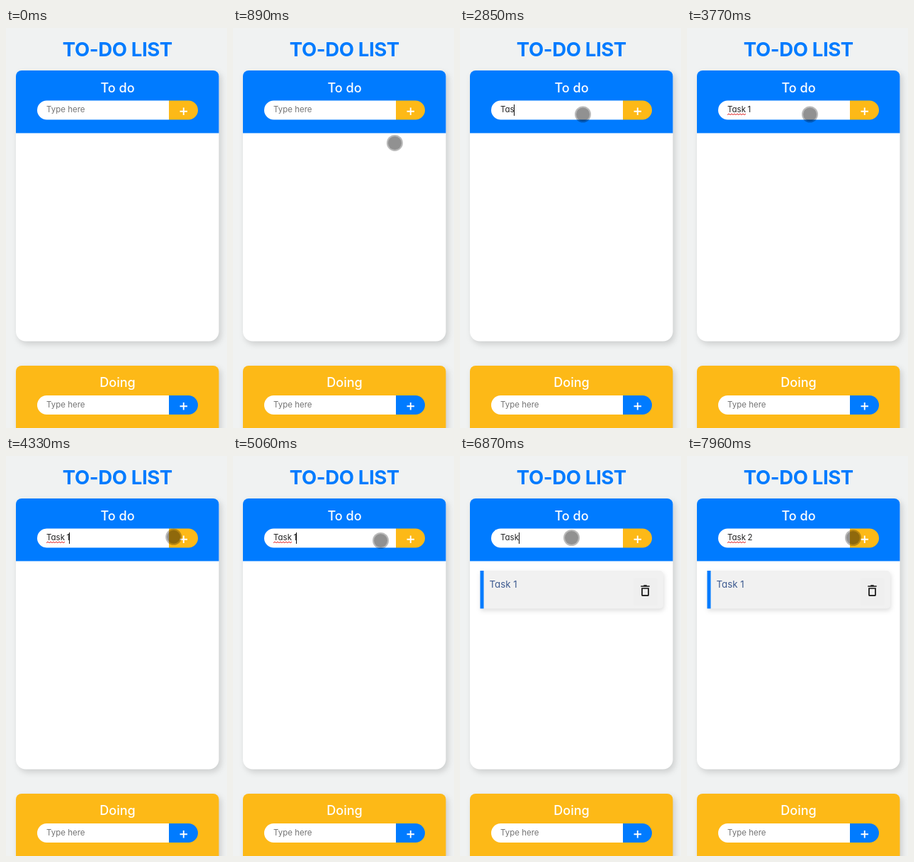
Animation of 312x565 px, one loop 8 s. Source, as an HTML page:

```html
<!DOCTYPE html>
<html lang="en">
<head>
<meta charset="utf-8">
<title>To-do list</title>
<style>
  html, body { margin: 0; width: 100%; height: 100%; overflow: hidden; background: #f0f2f2; }
  svg { display: block; width: 312px; height: 565px; }
  text { font-family: Inter, "Open Sans", sans-serif; font-feature-settings: "cv11"; }
  .title { font-size: 27.5px; font-weight: 700; fill: #007bff; text-anchor: middle; letter-spacing: -.35px; }
  .head { font-size: 18px; font-weight: 500; fill: #fff; text-anchor: middle; }
  .field { font-size: 11.5px; fill: #222; word-spacing: -.8px; }
  .hint { fill: #757575; word-spacing: 0; }
  .task { font-size: 13.3px; fill: #3d5a90; }
  .panel { filter: drop-shadow(3px 4px 4px rgba(0, 0, 0, .15)); }
  .card { filter: drop-shadow(1px 3px 3px rgba(0, 0, 0, .13)); }
</style>
</head>
<body>
<svg viewBox="0 0 312 565">
  <defs>
    <g id="bar">
      <path d="M57.5 0H230V27H57.5A13.5 13.5 0 0 1 57.5 0Z" fill="#fff"/>
      <path d="M230 0H257.5A13.5 13.5 0 0 1 257.5 27H230Z" fill="currentColor"/>
      <path d="M245.5 15.2H256M250.75 10V20.4" stroke="#fff" stroke-width="1.9"/>
    </g>
  </defs>
  <rect width="312" height="565" fill="#f0f2f2"/>
  <text class="title" x="157.3" y="40.3">TO-DO LIST</text>

  <path class="panel" d="M14 68a8 8 0 0 1 8-8H292.500a8 8 0 0 1 8 8V428.500a14 14 0 0 1-14 14H28a14 14 0 0 1-14-14Z" fill="#fff"/>
  <path d="M14 148.500V68a8 8 0 0 1 8-8H292.500a8 8 0 0 1 8 8V148.500Z" fill="#007bff"/>
  <text class="head" x="157.500" y="91">To do</text>
  <use href="#bar" y="102.500" color="#fdb917"/>

  <path class="panel" d="M14 570V485a8 8 0 0 1 8-8H292.500a8 8 0 0 1 8 8V570Z" fill="#fdb917"/>
  <text class="head" x="157.500" y="507.200">Doing</text>
  <use href="#bar" y="519" color="#007bff"/>
  <text class="field hint" x="57" y="536.300">Type here</text>

  <g id="card">
    <path class="card" d="M28.500 162H282a5 5 0 0 1 5 5V210.500a5 5 0 0 1-5 5H28.500Z" fill="#f1f1f1"/>
    <path d="M28.500 162H33.500V215.500H28.500Z" fill="#007bff"/>
    <rect x="244.500" y="172.500" width="34" height="39" rx="2" fill="#efefef"/>
    <text class="task" x="41.500" y="186">Task 1</text>
    <g fill="none" stroke="#111" stroke-width="1.700">
      <path d="M255.300 184H267.700M259.300 183H263.700"/>
      <path d="M257 187H266V196.200a1 1 0 0 1-1 1H258a1 1 0 0 1-1-1Z"/>
    </g>
  </g>

  <text id="entry" class="field" x="57" y="119.300"></text>
  <path id="wave" fill="none" stroke="#e02020" stroke-width="1"/>
  <path id="caret" d="M0 108V124" stroke="#111" stroke-width="1"/>
  <g id="pointer">
    <circle r="11.500" fill="#000" fill-opacity=".27"/>
    <circle r="9.500" fill="#000" fill-opacity=".22"/>
  </g>
</svg>
<script>
const LOOP = 8000;
const $ = id => document.getElementById(id);
const card = $('card'), entry = $('entry'), wave = $('wave'), caret = $('caret'), pointer = $('pointer');

// [time, text, caret x]
const typing = [
  [0, '', 58],
  [2460, 'T', 63.5], [2600, 'Ta', 70.5], [2780, 'Tas', 76.5], [2980, 'Task', 83.5],
  [3210, 'Task ', 86], [3310, 'Task 1', 89.5],
  [5400, '', 58],
  [6320, 'T', 63.5], [6480, 'Ta', 70.5], [6680, 'Tas', 76.5], [6870, 'Task', 83.5],
  [7010, 'Task ', 86], [7150, 'Task 2', 93]
];
// [time, caret visible]
const blinks = [[0, 0], [1580, 1], [2130, 0], [2460, 1], [3770, 0], [4320, 1], [5920, 0], [6320, 1], [7600, 0]];

const slowIn = u => Math.pow(u, 1.3);
const slowOut = u => 1 - (1 - u) * (1 - u);
const smooth = u => u * u * (3 - 2 * u);
// The pointer moves in short steps; each move begins where the last one ended.
const origin = [297, 213];
const moves = [
  { start: 750, step: 69, count: 9, to: [173.5, 122], ease: slowOut },
  { start: 3900, step: 70, count: 8, to: [239.5, 114], ease: smooth },
  { start: 4790, step: 67, count: 5, to: [208.5, 119.5], ease: slowIn },
  { start: 5130, step: 68, count: 6, to: [157.5, 115.5], ease: slowOut },
  { start: 7670, step: 72, count: 5, to: [234.5, 115.5], ease: smooth }
];

const latest = (rows, t) => rows.filter(row => row[0] <= t).pop();
const show = (el, on) => el.setAttribute('visibility', on ? 'visible' : 'hidden');

function pointerAt(t) {
  let pos = origin;
  for (const { start, step, count, to, ease } of moves) {
    if (t < start) break;
    const u = ease(Math.min(Math.floor((t - start) / step) + 1, count) / count);
    pos = pos.map((p, i) => p + (to[i] - p) * u);
  }
  return pos;
}

let zigzag = 'M57 122.6';
for (let i = 0; i < 13; i++) zigzag += `l2 ${i % 2 ? 1.4 : -1.4}`;
wave.setAttribute('d', zigzag);

function draw(t) {
  const [, text, x] = latest(typing, t);
  entry.textContent = text || 'Type here';
  entry.classList.toggle('hint', !text);
  show(wave, text.length > 4);
  show(caret, latest(blinks, t)[1]);
  caret.setAttribute('transform', `translate(${x})`);
  show(card, t >= 5400);
  show(pointer, t >= 690);
  pointer.setAttribute('transform', `translate(${pointerAt(t).join(' ')})`);
}

const begin = performance.now();
function tick() {
  draw((performance.now() - begin) % LOOP);
  requestAnimationFrame(tick);
}
tick();
</script>
</body>
</html>
```
